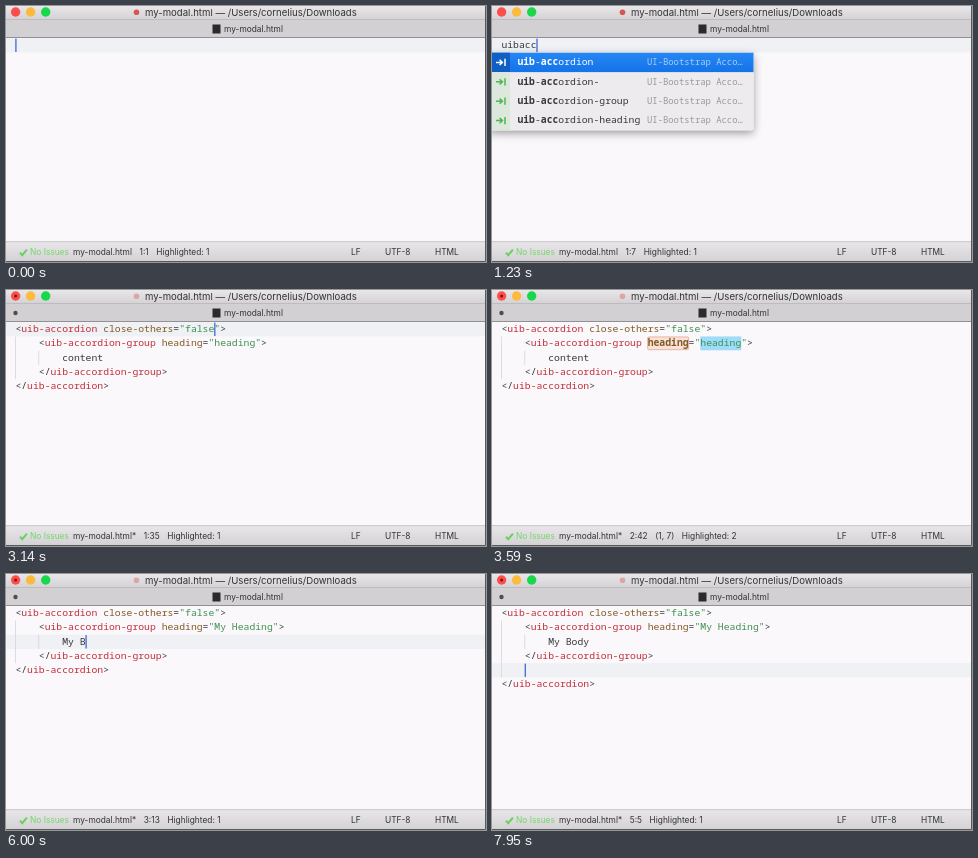
Recreate the animation shown at these times as an HTML page. Size 480 by 256 pixels, loop 8 s.

```html
<!DOCTYPE html>
<html lang="en">
<head>
<meta charset="utf-8">
<title>Editor snippet</title>
<style>
html, body { margin: 0; width: 100%; height: 100%; overflow: hidden; background: #faf8fb; }
svg { display: block; width: 480px; height: 256px; }
text { white-space: pre; }
.ui { font: 8.35px Inter, Roboto, sans-serif; fill: #333233; }
.code { font: 500 9.75px "Noto Sans Mono", "DejaVu Sans Mono", monospace; fill: #35373e; }
.code .tag { fill: #c02f39; }
.code .attr { fill: #805a24; }
.code .str { fill: #3f9150; }
.code .bold { font-weight: 700; }
.code.pick { fill: #fff; }
.hint { font: 8.9px "Noto Sans Mono", "DejaVu Sans Mono", monospace; fill: #9a9a9a; }
</style>
</head>
<body>
<svg viewBox="0 0 480 256" xmlns="http://www.w3.org/2000/svg">
  <defs>
    <linearGradient id="bar" x2="0" y2="1">
      <stop stop-color="#e8e6e8"/><stop offset="1" stop-color="#d3d1d3"/>
    </linearGradient>
    <linearGradient id="blue" x2="0" y2="1">
      <stop stop-color="#2586f3"/><stop offset="1" stop-color="#1474e8"/>
    </linearGradient>
    <filter id="shadow" x="-10%" y="-20%" width="120%" height="150%">
      <feDropShadow dx="0" dy="3" stdDeviation="4" flood-opacity=".38"/>
    </filter>
  </defs>
  <rect width="480" height="256" fill="#faf8fb"/>
  <g id="editor"></g>
  <rect width="480" height="14" fill="url(#bar)"/>
  <rect y="13.5" width="480" height="18" fill="#d2d0d2"/>
  <path d="M0 13.5H480" stroke="#bab8ba" stroke-width=".8"/>
  <path d="M0 31.5H480" stroke="#929092"/>
  <circle cx="9.6" cy="6" r="4.7" fill="#fc4f4d"/>
  <circle cx="24.6" cy="6" r="4.7" fill="#fdba3c"/>
  <circle cx="39.7" cy="6" r="4.7" fill="#16d84a"/>
  <circle id="unsaved" cx="9.6" cy="6" r="1.5" fill="#7d1214"/>
  <circle id="doc" cx="130.5" cy="6.3" r="2.8" fill="#d8564b"/>
  <text class="ui" x="139" y="9.6" style="font-size:9.6px">my-modal.html — /Users/cornelius/Downloads</text>
  <circle id="dot" cx="9.5" cy="23" r="2.2" fill="#4f4e4f"/>
  <rect x="206.5" y="18.5" width="8" height="9" fill="#2b2b2b"/>
  <text class="ui" x="218" y="26">my-modal.html</text>
  <rect y="236" width="480" height="20" fill="url(#bar)"/>
  <path d="M0 235.7H480" stroke="#b6b4b6" stroke-width=".8"/>
  <path d="M14 246.8l2.3 2.4 4.6-5.6" fill="none" stroke="#6bd05f" stroke-width="2"/>
  <text class="ui" x="24" y="249.3" style="fill:#73d768">No Issues</text>
  <text class="ui" id="status" x="67" y="249.3"></text>
  <text class="ui" x="345" y="249.3">LF</text>
  <text class="ui" x="379" y="249.3">UTF-8</text>
  <text class="ui" x="429" y="249.3">HTML</text>
  <path d="M479.5 0V255.5H0" fill="none" stroke="#5a595a"/>
  <g id="popup"></g>
</svg>
<script>
const LOOP = 8000, LEFT = 9.4, CHAR = 5.85, TOP = 32.2, LINE = 14.25;
const PREFIX = 'uibacc';
const NAMES = ['uib-accordion', 'uib-accordion-', 'uib-accordion-group', 'uib-accordion-heading'];
const T = { prefix: 600, insert: 1700, others: 2450, tabHeading: 3320, heading: 3750,
            tabBody: 4950, body: 5600, down: 6900, end: 7120, enter: 7480 };
const $ = id => document.getElementById(id);
const colX = c => LEFT + c * CHAR;
const rowY = r => TOP + r * LINE;
const esc = s => s.replace(/</g, '&lt;').replace(/>/g, '&gt;');
const typed = (word, t, start, step) =>
  t < start ? '' : word.slice(0, Math.floor((t - start) / step) + 1);
const rect = (x, y, w, h, fill, extra = '') =>
  `<rect x="${x}" y="${y}" width="${w}" height="${h}" fill="${fill}" ${extra}/>`;
const text = (x, y, cls, s) => `<text x="${x}" y="${y}" class="${cls}">${esc(s)}</text>`;

// Caret and selection are zero-based; sel is the selected length before the caret.
function stateAt(t) {
  const s = { lines: [''], row: 0, col: 0, sel: 0, marks: 1, dirty: t >= 1450, match: 0 };
  if (t < T.insert) {
    s.lines = [typed(PREFIX, t, T.prefix, 110)];
    s.match = s.col = s.lines[0].length;
    return s;
  }
  const others = typed('false', t, T.others, 150) || 'true|false';
  const heading = typed('My Heading', t, T.heading, 110) || 'heading';
  const body = typed('My Body', t, T.body, 120) || 'content';
  s.lines = [
    `<uib-accordion close-others="${others}">`,
    `    <uib-accordion-group heading="${heading}">`,
    `        ${body}`,
    '    </uib-accordion-group>',
    '</uib-accordion>'
  ];
  const place = (row, start, value, fresh) =>
    Object.assign(s, { row, col: start + value.length, sel: fresh ? value.length : 0 });
  if (t < T.tabHeading) place(0, 29, others, t < T.others);
  else if (t < T.tabBody) {
    place(1, 34, heading, t < T.heading);
    if (s.sel) s.marks = 2;
  }
  else if (t < T.down) place(2, 8, body, t < T.body);
  else if (t < T.enter) Object.assign(s, { row: 3, col: t < T.end ? 15 : 26 });
  else {
    s.lines.splice(4, 0, '    ');
    Object.assign(s, { row: 4, col: 4 });
  }
  return s;
}

function codeLine(line, row, bold) {
  let out = '', prev = '';
  for (const m of line.matchAll(/<\/?|>|"[^"]*"|=|[\w|-]+/g)) {
    const tok = m[0], next = line[m.index + tok.length];
    let cls = '';
    if (prev[0] === '<') cls = 'tag';
    else if (tok[0] === '"') cls = 'str';
    else if (next === '=') cls = bold ? 'attr bold' : 'attr';
    out += text(colX(m.index), rowY(row) + 10, cls, tok);
    prev = tok;
  }
  return out;
}

function drawEditor(s) {
  let out = '';
  if (!s.sel) out += rect(0, rowY(s.row), 480, LINE, '#f0f1f4');
  const guide = (col, row, n) => rect(colX(col) - .4, rowY(row), .8, n * LINE, '#d6d5da');
  if (s.lines.length > 1) out += guide(0, 1, s.lines.length - 2) + guide(4, 2, 1);
  if (s.sel) out += rect(colX(s.col - s.sel), rowY(s.row), s.sel * CHAR, LINE - .4, '#9edcfa');
  if (s.marks > 1) out += rect(colX(25), rowY(1) + .5, 7 * CHAR, LINE - 1.5, '#fbe1d7',
    'rx="1" stroke="#dfa794" stroke-width=".8"');
  out += '<g class="code">' +
    s.lines.map((l, i) => codeLine(l, i, i === 1 && s.marks > 1)).join('') + '</g>';
  if (!s.sel) out += rect(colX(s.col) - .2, rowY(s.row) + .4, 1.4, LINE - .8, '#4a74d9');
  return out;
}

function drawPopup(n) {
  if (!n) return '';
  const top = 46.7, h = 19.4;
  let out = rect(-3, top, 264.5, 4 * h, '#edebed', 'rx="2" filter="url(#shadow)"');
  NAMES.forEach((name, i) => {
    const y = top + i * h, mid = y + h / 2, pick = i === 0;
    if (pick) out += rect(0, y, 261.5, h, 'url(#blue)');
    out += rect(0, y, 18, h, pick ? '#0f5fc4' : '#dde8dc');
    out += `<path d="M4 ${mid}h6M7.6 ${mid - 2.6}l2.8 2.6-2.8 2.6M13 ${mid - 3.6}v7.2" fill="none"
      stroke="${pick ? '#fff' : '#4fb553'}" stroke-width="1.5"/>`;
    const a = Math.min(n, 3), b = Math.max(4, n + 1);
    const part = (from, to, cls) => text(25.4 + from * CHAR, mid + 2.8, cls, name.slice(from, to));
    out += `<g class="code ${pick ? 'pick' : ''}">` + part(0, a, 'bold') +
      part(a, 4, '') + (n > 3 ? part(4, b, 'bold') : '') + part(b, 99, '') + '</g>';
    out += `<text class="hint" x="155" y="${mid + 2.8}"${pick ? ' style="fill:#a9cdf8"' : ''}>UI-Bootstrap Acco…</text>`;
  });
  return out;
}

function drawStatus(s) {
  const parts = [`${s.row + 1}:${s.col + 1}`];
  if (s.sel) parts.push(`(1, ${s.sel})`);
  parts.push(`Highlighted: ${s.marks}`);
  return 'my-modal.html' + (s.dirty ? '*' : '') +
    parts.map(p => `<tspan dx="7.6">${p}</tspan>`).join('');
}

let last = '';
function render(t) {
  const s = stateAt(t), key = JSON.stringify(s);
  if (key === last) return;
  last = key;
  $('editor').innerHTML = drawEditor(s);
  $('popup').innerHTML = drawPopup(s.match);
  $('status').innerHTML = drawStatus(s);
  for (const id of ['dot', 'unsaved']) $(id).setAttribute('opacity', s.dirty ? 1 : 0);
  $('doc').setAttribute('opacity', s.dirty ? .4 : 1);
}

const start = performance.now();
function tick() {
  render((performance.now() - start) % LOOP);
  requestAnimationFrame(tick);
}
tick();
</script>
</body>
</html>
```
